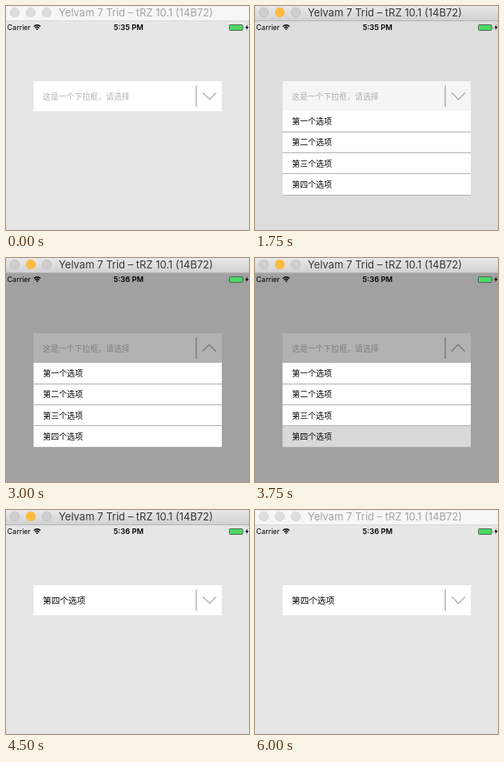
Write an HTML page that moves like this. It is 304 px wide and 280 px high and loops after 6250 ms.

```html
<!DOCTYPE html>
<html lang="zh">
<head>
<meta charset="utf-8">
<style>
  html, body { margin: 0; width: 100%; height: 100%; overflow: hidden; background: #e6e6e6; }
  svg { display: block; width: 304px; height: 280px; }
  text { font-family: "Noto Sans CJK SC", "Noto Sans CJK", sans-serif; font-size: 10px; }
  .latin { font-family: Inter, sans-serif; font-size: 9px; }
  #title { font-size: 13px; }
  #clock { font-size: 9.3px; font-weight: 600; text-anchor: middle; }
  #chevron { fill: none; stroke: #b4b4b4; stroke-width: 1.5; }
</style>
</head>
<body>
<svg viewBox="0 0 304 280">
  <defs>
    <linearGradient id="chrome" x2="0" y2="1">
      <stop stop-color="#e9e9e9"/><stop offset="1" stop-color="#d1d1d1"/>
    </linearGradient>
  </defs>
  <rect width="304" height="280" fill="#e6e6e6"/>

  <rect x="34.5" y="94" width="235.5" height="37.5" fill="#fff"/>
  <text id="value" x="46"></text>
  <path d="M238 99.5V126" stroke="#c6c6c6" stroke-width="2"/>
  <path id="chevron" d="M246 108.3L254.5 116.8L263 108.3"/>

  <rect id="shade" y="19" width="304" height="261"/>
  <g id="menu"></g>

  <text class="latin" x="1.5" y="30">Carrier</text>
  <g fill="none" stroke="#000" stroke-width="1.4">
    <path d="M34.8 25.6Q39 21.8 43.2 25.6M36.5 27.5Q39 25.2 41.5 27.5"/>
  </g>
  <path d="M37.5 28.6Q39 27.4 40.5 28.6L39 30.2Z"/>
  <text id="clock" class="latin" x="153.3" y="30"></text>
  <rect x="279.5" y="23.5" width="16.5" height="7" rx="1" fill="#4cd964" stroke="#444" stroke-width=".8"/>
  <path d="M297 25.6q1.3 1.4 0 2.8z" fill="#444"/>
  <path d="M302.3 23L299.3 27.4H301.2L300.4 30.5L303.6 26.1H301.6Z"/>

  <rect id="bar" width="304" height="18"/>
  <rect id="barEdge" y="18" width="304" height="1"/>
  <g id="buttons" stroke-width=".7">
    <circle cx="11" cy="8" r="5.8"/><circle cx="31" cy="8" r="5.8"/><circle cx="51" cy="8" r="5.8"/>
  </g>
  <text id="title" class="latin" x="66" y="13">Yelvam 7 Trid – tRZ 10.1 (14B72)</text>
</svg>
<script>
const LOOP = 6250, ROW = 26.3, MENU_TOP = 131;
const options = ['第一个选项', '第二个选项', '第三个选项', '第四个选项'];
const byId = id => document.getElementById(id);
const set = (node, attrs) => {
  for (const key in attrs) node.setAttribute(key, attrs[key]);
};

byId('menu').innerHTML = options.map((label, i) => {
  const y = MENU_TOP + i * ROW;
  return `<rect x="34.5" y="${y}" width="235.5" height="${ROW}" fill="#fff"/>
    <text x="46.3" y="${y + 17}">${label}</text>`;
}).join('') + options.map((_, i) => {
  const y = Math.floor(MENU_TOP + (i + 1) * ROW) + .5;
  return `<path d="M34.5 ${y}H270" stroke="#b0b0b0"/>`;
}).join('');
const rows = byId('menu').querySelectorAll('rect');
const buttons = byId('buttons').children;

function draw(t) {
  const active = t >= 1750 && t < 6000;
  const open = t >= 1750 && t < 4250;
  const chosen = t >= 4250;

  set(byId('bar'), { fill: active ? 'url(#chrome)' : '#f6f6f6' });
  set(byId('barEdge'), { fill: active ? '#b3b3b3' : '#d9d9d9' });
  set(byId('title'), { fill: active ? '#363636' : '#a3a3a3' });
  [...buttons].forEach((button, i) => {
    const lit = active && i === 1;
    set(button, {
      fill: lit ? '#fdbc40' : active ? '#cecece' : '#dcdcdc',
      stroke: lit ? '#fab636' : active ? '#bababa' : '#d0d0d0'
    });
  });
  byId('clock').textContent = t < 3000 ? '5:35 PM' : '5:36 PM';

  byId('value').textContent = chosen ? options[3] : '这是一个下拉框，请选择';
  set(byId('value'), { fill: chosen ? '#000' : '#b2b2b2', y: 116.8 });
  byId('value').style.fontSize = chosen ? '10.7px' : '9.9px';

  const angle = t >= 2000 && t < 4250 ? 180 : t >= 4250 && t < 4500 ? 20 : 0;
  set(byId('chevron'), { transform: `rotate(${angle} 254.3 112.5)` });
  set(byId('shade'), { opacity: !open ? 0 : t < 2000 ? .04 : .3 });
  set(byId('menu'), { visibility: open ? 'visible' : 'hidden' });
  set(rows[3], { fill: t >= 3750 ? '#d9d9d9' : '#fff' });
}

function tick() {
  draw(performance.now() % LOOP);
  requestAnimationFrame(tick);
}
tick();
</script>
</body>
</html>
```
